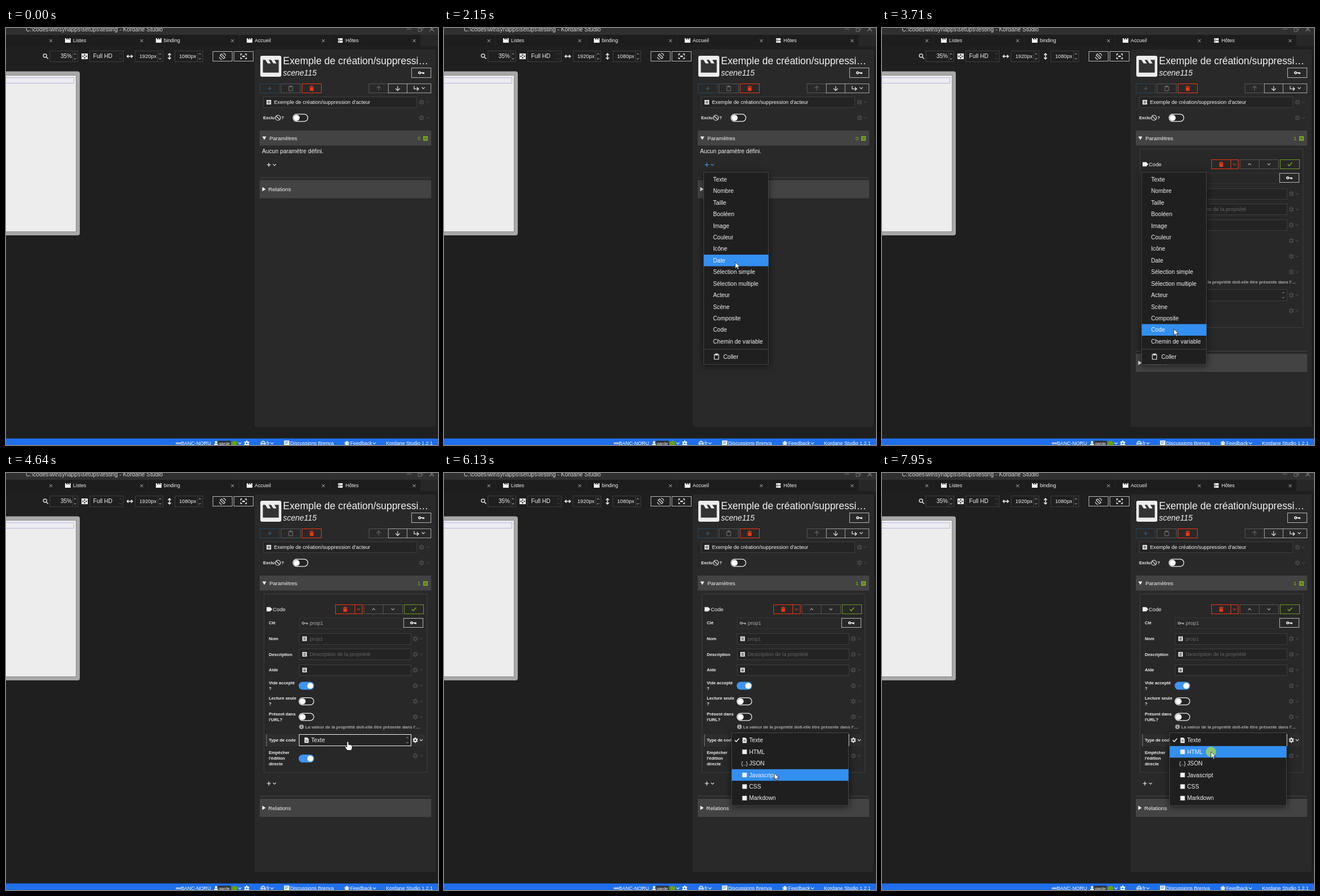
An HTML page for the animation above (8000 ms loop, 761 px wide and 736 px high).

```html
<!DOCTYPE html>
<html lang="fr">
<head>
<meta charset="utf-8">
<title>Éditeur de scène</title>
<style>
  html, body { margin: 0; width: 100%; height: 100%; overflow: hidden; background: #1f1f1f; }
  svg { display: block; width: 761px; height: 736px; font-family: "Liberation Sans", Arial, sans-serif; }
  text { white-space: pre; }
  .menu { filter: drop-shadow(0 2px 6px rgba(0, 0, 0, .6)); }
</style>
</head>
<body>
<svg id="stage" viewBox="0 0 761 736"></svg>
<script>
// Icons are centred on 0,0: [path, stroke width]; width 0 means filled.
const ICONS = {
  clap: ['M-5-4h1.6l1.4 2.2h2L-1.400-4h1.600l1.400 2.200h2L2.200-4H5v8H-5z', 0],
  list: ['M-4-4h8v8h-8zM-2.500-2.300v.9h5v-.9zM-2.500-.45v.9h5v-.9zM-2.500 1.400v.9h5v-.9z', 0],
  hosts: ['M-4.500-4.500h9v4h-9zM-4.500.5h9v4h-9zM-3-3v1h1.500v-1zM-3 2v1h1.500v-1z', 0],
  close: ['M-2.500-2.500l5 5m0-5l-5 5', 1],
  min: ['M-4 0h8', 1],
  restore: ['M-4-1.500h5.500V4H-4zM-2-1.500V-4h6v5.500H1.500', 1],
  chev: ['M-2.600-1.300L0 1.300 2.600-1.300', 1.1],
  chevUp: ['M-2.600 1.300L0-1.300 2.600 1.300', 1.1],
  plus: ['M-3.500 0h7M0-3.500v7', 1.2],
  trash: ['M-3.800-3.400h2.200l.7-1h1.800l.7 1h2.200v1.200h-7.600zM-3.200-1.600h6.400V4.500h-6.400z', 0],
  clip: ['M-3.800-3.800h7.600v8.600h-7.600zM-1.700-5h3.400v2.200h-3.400z', 1.1],
  up: ['M0 4V-4M-3.800-.2L0-4 3.800-.2', 1.1],
  down: ['M0-4V4M-3.800.2L0 4 3.800.2', 1.1],
  sub: ['M-4-4V1H3.500M.8-2L3.800 1 .8 4', 1.2],
  key: ['M-4.800 0a1.800 1.800 0 1 0 3.600 0a1.800 1.800 0 1 0-3.600 0M-1.200 0H5.500M4.500 0v2.300M2.500 0v2', 1.6],
  ban: ['M-4.500 0a4.500 4.500 0 1 0 9 0a4.500 4.500 0 1 0-9 0M-3.200-3.200l6.400 6.400', 1.2],
  gear: ['M-2.500 0a2.500 2.500 0 1 0 5 0a2.500 2.500 0 1 0-5 0M0-4.800v1.700M0 4.800v-1.700M-4.100-2.400l1.500.9M4.100-2.400l-1.500.9M-4.100 2.400l1.500-.9M4.100 2.400l-1.500-.9', 1.9],
  lens: ['M-4.300-1.200a3 3 0 1 0 6 0a3 3 0 1 0-6 0M1 1.200L4.400 4.500', 1.3],
  grid: ['M-5.500-5h11V5h-11zM0-4L1.600-2.500 0-1-1.600-2.500zM0 1L1.600 2.500 0 4-1.600 2.500zM-3-1.600L-1.500 0-3 1.600-4.500 0zM3-1.600L4.500 0 3 1.600 1.500 0z', 0],
  horiz: ['M-4.500 0h9M-2.300-2.600L-4.900 0l2.600 2.600M2.300-2.600L4.900 0 2.300 2.600', 1.4],
  vert: ['M0-4.500v9M-2.600-2.300L0-4.900l2.600 2.600M-2.600 2.300L0 4.900l2.600-2.600', 1.4],
  spin: ['M-1.900-3.300L0-5.200l1.900 1.900M-1.900 3.300L0 5.200l1.900-1.900', 1],
  turn: ['M-2-4.300L4.300 2 2 4.300-4.300-2zM1-5.500Q5-5 5.500-1M-1 5.500Q-5 5-5.500 1', 1.1],
  fit: ['M-5-1.500V-4h2.500M2.500-4H5v2.500M5 1.500V4H2.500M-2.500 4H-5V1.500M-1.500-.6h3v1.200h-3z', 1.3],
  open: ['M-3.500-3h7L0 3z', 0],
  shut: ['M-2.500-3.800L3.500 0-2.500 3.800z', 0],
  tag: ['M-5-3.700h6.500L5 0 1.500 3.700H-5z', 0],
  info: ['M-4 0a4 4 0 1 0 8 0a4 4 0 1 0-8 0M-.6-2.400v1.200H.6v-1.200zM-.6-.5v2.900H.6V-.5z', 0],
  file: ['M-3.700-4.800h4.700l2.700 2.700V4.800h-7.400zM-2-.8v.9h4v-.9zM-2 1.500v.9h4v-.9z', 0],
  check: ['M-3.800 0l2.600 2.700L3.800-3', 1.3],
  square: ['M-4-4h8v8h-8z', 0],
  globe: ['M-4.200 0a4.200 4.200 0 1 0 8.400 0a4.200 4.200 0 1 0-8.400 0M-2 0a2 4.200 0 1 0 4 0a2 4.200 0 1 0-4 0M-4.200 0h8.400', 1],
  chat: ['M-4.700-4.700h9.400v7.800h-7l-2.400 2.400zM-3-2.800v1h6v-1zM-3-.3v1h4v-1z', 0],
  bug: ['M-1-3.500h2M-1-2h2v5h-2zM-4-2l2 1M4-2l-2 1M-4 1h8M-4 4l2-1M4 4l-2-1', 1.4],
  user: ['M0-4.500a2.200 2.200 0 1 0 .01 0zM-4 4.500q0-4.200 4-4.200t4 4.200z', 0]
};
const WHITE = '#f2f2f2', DIM = '#464646', RED = '#f5350f', GREEN = '#7bb31a', BLUE = '#338ff0';
const LINE = '#3d3d3d', SOFT = '#b8b8b8';

const icon = (name, x, y, color = WHITE, scale = 1) => {
  const [d, w] = ICONS[name];
  const paint = w ? `fill="none" stroke="${color}" stroke-width="${w}"` : `fill="${color}" fill-rule="evenodd"`;
  return `<path d="${d}" ${paint} transform="translate(${x} ${y}) scale(${scale})"/>`;
};
const text = (s, x, y, size = 10.2, color = WHITE, extra = '') =>
  `<text x="${x}" y="${y}" font-size="${size}" fill="${color}" ${extra}>${s}</text>`;
const fill = (x, y, r, b, color, extra = '') =>
  `<rect x="${x}" y="${y}" width="${r - x}" height="${b - y}" fill="${color}" ${extra}/>`;
const box = (x, y, r, b, stroke, color = 'none') =>
  fill(x + .5, y + .5, r - .5, b - .5, color, `stroke="${stroke}"`);
const button = (x, y, r, b, stroke, name, color, scale) =>
  box(x, y, r, b, stroke) + icon(name, (x + r) / 2, (y + b) / 2, color, scale);
const group = (id, body, extra = '') => `<g id="${id}" ${extra}>${body}</g>`;
const label = (lines, y) => lines.split('|').map((s, i, all) =>
  text(s, 463, y + 2.5 + (i - (all.length - 1) / 2) * 10, 7.5, WHITE, 'font-weight="700"')).join('');
const gear = (x, y, color = DIM) => icon('gear', x, y, color) + icon('chev', x + 10.5, y, color);
const toggle = (x, y, on) =>
  `<rect x="${x + .7}" y="${y - 6.3}" width="26" height="12.600" rx="6.300" fill="${on ? '#3f94f2' : '#242424'}" stroke="${on ? '#3f94f2' : WHITE}" stroke-width="1.300"/>` +
  `<circle cx="${on ? x + 20.5 : x + 7}" cy="${y}" r="5.300" fill="#fff"/>`;

function windowBar() {
  const tabs = [['Listes', 'clap'], ['binding', 'clap'], ['Accueil', 'clap'], ['Hôtes', 'hosts']];
  let s = fill(0, 0, 761, 12, '#303030') + fill(0, 12, 761, 32, '#272727') + fill(0, 12, 730, 32, '#1d1d1d');
  s += text('C:\\codes\\wit\\synapps\\setups\\testing - Kordane Studio', 35, 6, 10.2, '#d6d6d6');
  s += icon('min', 710, 2, '#777') + icon('restore', 730, 2, '#777') + icon('close', 750, 2, '#777', 1.5);
  s += icon('close', 79, 22.5, '#bbb');
  tabs.forEach(([name, pic], i) => {
    const x = 90 + i * 160;
    s += fill(x, 12, x + 1, 32, '#252525') + icon(pic, x + 19, 22, WHITE, pic === 'clap' ? 1 : .9);
    s += text(name, x + 28, 25, 8.9) + icon('close', x + 149, 22.5, '#bbb');
  });
  return s;
}

function toolbar() {
  let s = icon('lens', 70, 50) + icon('grid', 138.5, 50);
  for (const [x, value, size, tx] of [[77, '35%', 10, 96], [147, 'Full HD', 10.2, 153.5], [227, '1920px', 9.2, 235], [297, '1080px', 9.2, 305]]) {
    const wide = x === 147 ? 60 : 50;
    s += box(x, 40, x + wide, 60, LINE) + text(value, tx, 53, size);
    s += icon('spin', x + wide - 5.5, 50, wide === 60 ? '#555' : '#ccc');
    if (wide === 50) s += fill(x + 40, 41, x + 41, 59, LINE);
  }
  s += icon('horiz', 218, 50) + icon('vert', 288, 50);
  return s + button(364, 41, 399, 59, SOFT, 'turn') + button(401, 41, 436, 59, SOFT, 'fit');
}

const canvasArea = () =>
  '<rect x="-10" y="76.500" width="140" height="289.500" rx="4" fill="#a8a8a8"/>' +
  box(-5, 83, 124, 360, '#8d8d8d', '#ededed') + box(-5, 87, 120, 98, '#b4b9e0', '#ebebf1');

function header() {
  let s = fill(438, 38, 757, 704, '#292929', 'rx="3"');
  s += fill(448, 49, 485, 86, '#ededed', 'rx="3"') + icon('clap', 466.5, 67.5, '#333', 2.8);
  s += text('Exemple de création/suppressi…', 488, 63.5, 17.45);
  s += text('scene115', 488, 84, 13.9, WHITE, 'font-style="italic"');
  s += button(714, 70, 749, 88, SOFT, 'key');
  s += button(447, 98, 482, 115, '#24495e', 'plus', '#2b6384');
  s += button(484, 98, 519, 115, '#555', 'clip', '#777', .9);
  s += button(521, 98, 556, 115, RED, 'trash', RED);
  s += button(639, 98, 674, 115, '#555', 'up', '#666');
  s += box(673, 98, 749, 115, '#a5a5a5') + fill(706, 98, 707, 115, '#a5a5a5');
  s += icon('down', 690, 106.5) + icon('sub', 723, 106.5) + icon('chev', 735, 106);
  s += fill(448, 121, 449, 142, '#222') + box(453, 121, 724, 141, LINE, '#242424');
  s += icon('list', 463, 131) + text("Exemple de création/suppression d'acteur", 472, 134, 9.15) + gear(732, 131);
  s += fill(448, 148, 449, 169, '#222') + text('Exclu', 453, 161, 7.6, WHITE, 'font-weight="700"');
  s += icon('ban', 479, 158.5) + text('?', 485, 161, 7.6, WHITE, 'font-weight="700"');
  s += toggle(505, 158.5) + gear(732, 158.5);
  s += fill(447, 181, 749, 207.5, '#434343') + icon('open', 455, 194.5) + text('Paramètres', 464, 197.5, 9.5);
  return s + text('0', 725, 198, 9.5, GREEN, 'id="count"') + icon('list', 739, 195, GREEN);
}

const tail = () =>
  group('add', icon('plus', 463, 241.5, 'currentColor') + icon('chev', 473, 241.5, 'currentColor')) +
  fill(447, 263.5, 749, 264.5, '#444') + fill(447, 268.5, 749, 300.5, '#434343') +
  icon('shut', 454, 284.5) + text('Relations', 462, 288, 9.6);

function card() {
  let s = box(454, 213, 742, 529, LINE, '#282828') + icon('tag', 464, 240.5) + text('Code', 470, 243.5, 9.3);
  s += button(580, 232, 615, 249, RED, 'trash', RED) + button(614, 232, 628, 249, RED, 'chev', RED);
  s += button(630, 232, 665, 249, '#555', 'chevUp', SOFT) + button(664, 232, 699, 249, '#555', 'chev', SOFT);
  s += button(701, 232, 736, 249, '#6c9a1e', 'check', GREEN);
  s += label('Clé', 264.5) + box(516, 255, 701, 275, '#343434') + icon('key', 526.5, 265, '#999');
  s += text('prop1', 535, 268, 9.3, '#aaa') + button(700, 256, 735, 273, SOFT, 'key');
  [['Nom', 'prop1'], ['Description', 'Description de la propriété'], ['Aide', '']].forEach(([name, hint], i) => {
    const y = 292.5 + i * 27.6;
    s += label(name, y) + box(516, Math.round(y - 10), 714, Math.round(y + 10), LINE, '#242424');
    s += icon('list', 526, y) + text(hint, 535, y + 3.3, 9.15, '#646464') + gear(721, y);
  });
  [['Vide accepté|?', 1], ['Lecture seule|?', 0], ["Présent dans|l'URL?", 0]].forEach(([name, on], i) => {
    const y = 375.5 + i * 27.5;
    s += label(name, y - .5) + toggle(515.5, y, on) + gear(721, y);
  });
  s += icon('info', 520.5, 448, '#aaa');
  s += text("La valeur de la propriété doit-elle être présente dans l'…", 527, 451, 7.6, '#aaa', 'font-weight="700"');
  for (const y of [264.5, 292.5, 320, 348, 375.5, 403, 436, 504]) s += fill(458, y - 10, 459, y + 10, '#222');
  s += fill(458, 461, 738, 482.5, '#2d2d2d', 'id="rowTint"') + fill(458, 461, 459.5, 482.500, '#666', 'id="rowBar"');
  s += label('Type de code', 471.5) + box(516, 461, 714, 482, 'currentColor', '#242424').replace('<rect', '<rect id="select"');
  s += icon('file', 529.5, 471.5) + text('Texte', 537.5, 475.3) + icon('spin', 707, 471.5, '#aaa');
  s += group('typeGear', gear(721, 471.5, 'currentColor'));
  s += label("Empêcher|l'édition|directe", 503.5) + toggle(515.5, 504, 1);
  return s + group('editGear', gear(721, 499, 'currentColor'));
}

const PITCH = 20.43, KINDS_TOP = 257, CODES_TOP = 461.5;

function kindMenu() {
  const names = ['Texte', 'Nombre', 'Taille', 'Booléen', 'Image', 'Couleur', 'Icône', 'Date', 'Sélection simple',
    'Sélection multiple', 'Acteur', 'Scène', 'Composite', 'Code', 'Chemin de variable'];
  return box(457, 254, 572, 594.5, '#464646', '#1f1f1f').replace('<rect', '<rect class="menu"') +
    fill(457.5, 0, 571.5, PITCH, BLUE, 'id="kindMark"') +
    names.map((n, i) => text(n, 474, 270.800 + i * PITCH)).join('') +
    fill(458, 566.5, 571, 567.5, '#464646') + icon('clip', 480, 580) + text('Coller', 492, 583.5);
}

function codeMenu() {
  const names = ['Texte', 'HTML', 'JSON', 'Javascript', 'CSS', 'Markdown'];
  return box(506, 458, 713, 587.5, '#464646', '#1f1f1f').replace('<rect', '<rect class="menu"') +
    fill(507, 0, 712.5, PITCH, BLUE, 'id="codeMark"') + icon('check', 516, 471.5, '#fff') +
    names.map((n, i) => {
      const y = 471.7 + i * PITCH;
      const pic = n === 'JSON' ? text('{..}', 523.5, y + 3, 9.5) : icon(i ? 'square' : 'file', 529.5, y);
      return pic + text(n, 537.5, y + 3.6);
    }).join('');
}

function statusBar() {
  const y = 736.3, t = (s, x) => text(s, x, y, 8.75, '#fff');
  return fill(0, 724.5, 761, 736, '#1f6feb') + fill(299, 731.5, 308, 734.5, '#b9c4d2') + t('BANC-NORU', 308) +
    icon('user', 370, 733, '#fff', .9) + fill(373.5, 728.5, 396, 736, '#333') + text('garde', 375, y, 7.6, '#fff') +
    `<circle cx="402.500" cy="733.500" r="5" fill="#6aa010"/>` + icon('chev', 412, 733, '#fff') + icon('gear', 424, 733, '#fff') +
    icon('globe', 453, 733.3, '#fff') + t('fr', 459) + icon('chev', 468.5, 733, '#fff') +
    icon('chat', 494.5, 733, '#fff') + t('Discussions Brenva', 500.5) +
    icon('bug', 600.5, 733, '#fff') + t('Feedback', 606.5) + icon('chev', 649, 733, '#fff') + t('Kordane Studio 1.2.1', 669.5);
}

const pointer = (id, d) => `<path id="${id}" d="${d}" fill="#fff" stroke="#111" stroke-width=".8" stroke-linejoin="round"/>`;

document.getElementById('stage').innerHTML =
  windowBar() + toolbar() + canvasArea() + header() +
  group('empty', text('Aucun paramètre défini.', 451, 221.2)) + group('card', card()) + group('tail', tail()) + statusBar() +
  group('kinds', kindMenu()) + group('codes', codeMenu()) +
  '<circle id="click" r="9" fill="#a2d05f" fill-opacity=".85"/>' +
  pointer('arrow', 'M0 0V11.500L2.700 9l1.900 4.200 1.800-.8L4.600 8.300H8.300z') +
  pointer('hand', 'M-1.400 1.300a1.400 1.400 0 0 1 2.800 0V5.300Q7 5.800 7.800 7.500V11L6.300 15.500H-.8L-4.800 10q-.2-2 1.700-1.500l1.700 1.500z');

// Cursor tip: time, x, y. It moves in ticks of about 67 ms.
const PATH = [
  [520, 692, 718], [900, 566, 425], [1150, 480, 268], [1280, 464, 244], [1813, 464, 244],
  [2150, 513, 413], [2400, 515, 482], [2630, 514, 520], [2760, 514, 530], [2833, 514, 530], [2900, 514, 531],
  [3843, 514, 531], [4250, 546, 506], [4640, 602, 474], [4710, 600, 473], [5573, 600, 473], [5640, 595, 473],
  [6000, 584, 521], [6410, 573, 574], [6480, 573, 576], [6743, 573, 576], [6940, 577, 545],
  [7350, 580, 477], [7423, 580, 477], [7750, 579.5, 492], [8001, 579.5, 492]
];
const TICK = 66.7;

function cursorAt(t) {
  if (t < PATH[0][0]) return PATH[0].slice(1);
  const i = PATH.findIndex(p => p[0] > t);
  const [ta, xa, ya] = PATH[i - 1], [tb, xb, yb] = PATH[i];
  const n = Math.max(1, Math.round((tb - ta) / TICK));
  const k = Math.floor((t - ta) / (tb - ta) * n) / n;
  return [xa + (xb - xa) * k, ya + (yb - ya) * k];
}

const $ = id => document.getElementById(id);
const show = (id, on) => $(id).setAttribute('display', on ? 'inline' : 'none');
const tint = (id, color) => $(id).setAttribute('color', color);
const move = (id, x, y) => $(id).setAttribute('transform', `translate(${x} ${y})`);
const within = (t, a, b) => t >= a && t < b;

function mark(id, y, top, count, on) {
  const row = Math.floor((y - top) / PITCH);
  show(id, on && row >= 0 && row < count);
  move(id, 0, top + row * PITCH);
}

function draw(t) {
  const [x, y] = cursorAt(t);
  const added = t >= 3570, free = t >= 3910, picking = t >= 4850;
  const overType = picking || free && within(y, 461, 483);
  const overAdd = within(t, 1200, 3570);

  show('empty', !added);
  show('card', added);
  move('tail', 0, added ? 306.5 : 0);
  $('count').textContent = added ? 1 : 0;
  tint('add', overAdd ? '#4b9cf5' : WHITE);

  show('rowTint', overType);
  show('rowBar', overType);
  tint('select', overType ? WHITE : LINE);
  tint('typeGear', overType ? WHITE : DIM);
  tint('editGear', free && !picking && within(y, 487, 522) ? WHITE : DIM);

  show('kinds', within(t, 1350, 3910));
  mark('kindMark', y, KINDS_TOP, 15, !within(t, 3570, 3710));
  show('codes', picking);
  mark('codeMark', y, CODES_TOP, 6, true);

  const hand = within(t, 1200, 1880) || free && t < 4980 && overType;
  show('hand', hand);
  show('arrow', !hand && t >= 520);
  show('click', within(t, 1280, 1350) || within(t, 3510, 3570) || within(t, 4780, 4850) || t >= 7950);
  for (const id of ['hand', 'arrow', 'click']) move(id, x, y);
}

const start = performance.now();
function frame() {
  draw((performance.now() - start) % 8000);
  requestAnimationFrame(frame);
}
frame();
</script>
</body>
</html>
```
